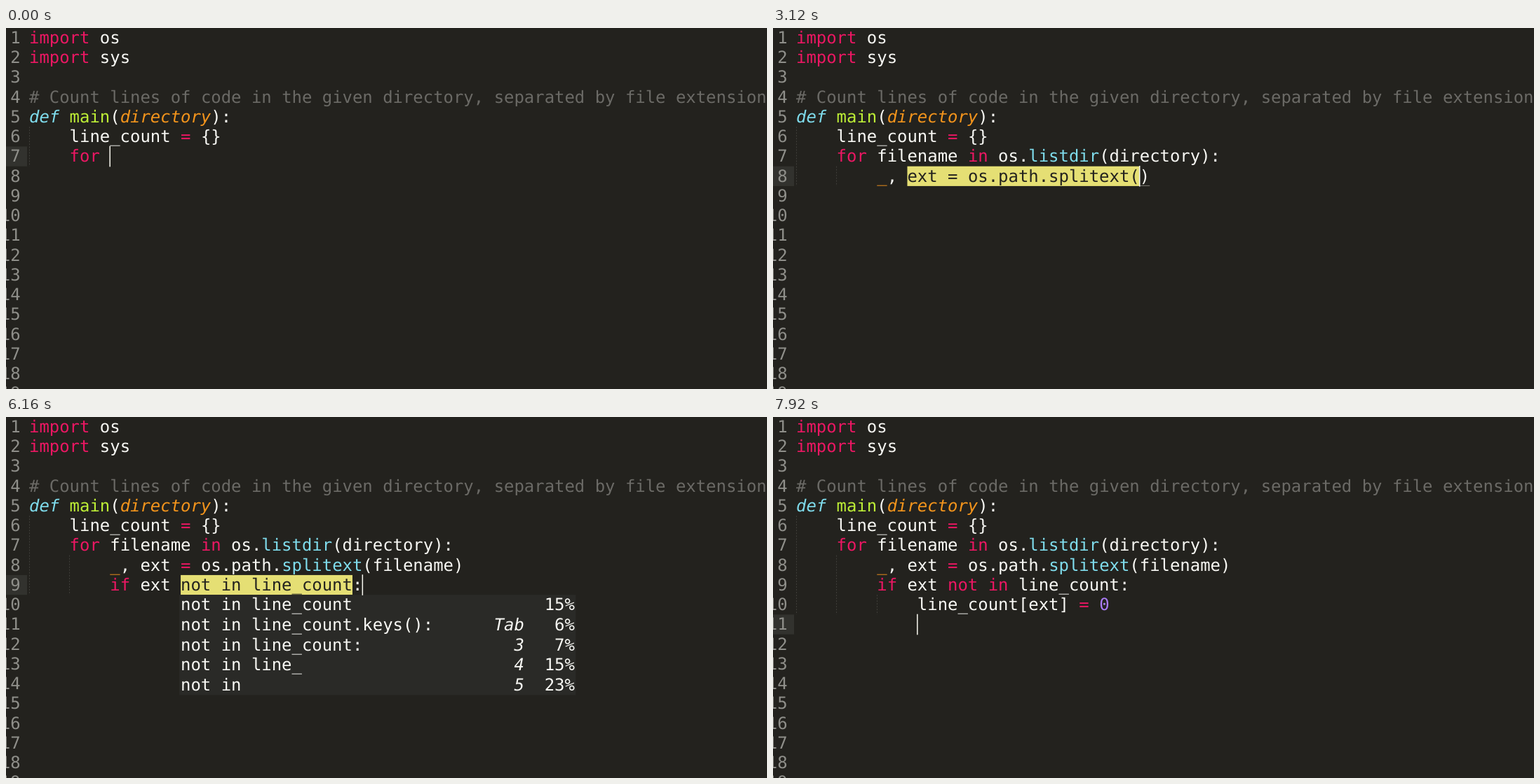
Recreate the animation shown at these times as an HTML page. Size 1085x516 px, loop 8 s.

```html
<!DOCTYPE html>
<html lang="en">
<head>
<meta charset="utf-8">
<title>Typing with completions</title>
<style>
  html, body { margin: 0; width: 100%; height: 100%; overflow: hidden; background: #23221e; }
  svg { display: block; width: 1085px; height: 516px; }
  text {
    font: 23.93px "DejaVu Sans Mono", "Liberation Mono", monospace;
    text-rendering: geometricPrecision;
    fill: #f8f8f4;
  }
  text.num { fill: #8f8f8a; }
  text.comment { fill: #6b6a66; }
  text.key { fill: #ec1763; }
  text.def { fill: #7fdcec; font-style: italic; }
  text.call { fill: #7fdcec; }
  text.name { fill: #bdee36; }
  text.arg { fill: #f3941c; font-style: italic; }
  text.skip { fill: #f3941c; }
  text.lit { fill: #aa7cf6; }
  text.dark { fill: #23221e; }
  text.it { font-style: italic; }
</style>
</head>
<body>
<svg id="stage" viewBox="0 0 1085 516"></svg>
<script>
(() => {
const LOOP = 8000, X0 = 33, CW = 14.405, LH = 28.24, ROW = 28.75, BASE = 22;
const colX = c => X0 + c * CW;
const lineY = n => (n - 1) * LH;
const pad = n => ' '.repeat(n);

const code = [
  'import os',
  'import sys',
  '',
  '# Count lines of code in the given directory, separated by file extension',
  'def main(directory):',
  '    line_count = {}',
  '    for filename in os.listdir(directory):',
  '        _, ext = os.path.splitext(filename)',
  '        if ext not in line_count:',
  '            line_count[ext] = 0'
];

// Completion lists: start column, then "text|percent" rows
const menus = {
  loop: [8, 'filename in os.listdir(directory):|24%', 'filename in os.listdir(|18%',
    'file in os.listdir(directory):|9%', 'filename in|21%', 'filename|26%'],
  split: [11, 'ext = os.path.splitext(|31%', 'ext = os.path.splitext(filename)|14%',
    'ext = os.path.|17%', 'ext = os.|12%', 'ext =|22%'],
  file: [34, 'filename)|42%', 'filename|27%', 'file)|8%', 'file|6%', 'f)|3%'],
  cond: [8, 'if os.path.isdir(os.path.join(directory, ext))|5%', 'if os.path.isdir(|11%',
    'if ext not in|9%', 'if ext ==|13%', 'if ext|28%'],
  ext: [11, 'ext|38%', "ext not in ['.py', '.js']|4%", 'ext not in|12%', 'ext ==|15%', 'ext in|9%'],
  test: [15, 'not in line_count|15%', 'not in line_count.keys():|6%', 'not in line_count:|7%',
    'not in line_|15%', 'not in|23%'],
  first: [12, 'line_count[ext]|19%', 'line_count[ext] = len(filename|4%', 'line_count[ext] = 0|6%',
    'line_count|17%', 'line|8%'],
  set: [12, 'line_count[ext] =|16%', 'line_count[ext]|17%', 'line_count[ext] = 1|11%',
    'line_count[ext] = 0|4%', 'line_count|17%']
};

// [start ms, line, text, options]; mark = picked columns, menu = open list, caret = column
const steps = [
  [0, 7, '    for '],
  [320, 7, '    for f', { menu: 'loop' }],
  [800, 7, code[6], { menu: 'loop', mark: [8, 42] }],
  [1360, 8, pad(8)],
  [1600, 8, pad(8) + '_'],
  [1760, 8, pad(8) + '_,'],
  [1880, 8, pad(8) + '_, '],
  [2160, 8, pad(8) + '_, e', { menu: 'split' }],
  [2800, 8, pad(8) + '_, ext = os.path.splitext()', { mark: [11, 34], caret: 34, pair: 34 }],
  [3280, 8, pad(8) + '_, ext = os.path.splitext(f)', { menu: 'file', caret: 35, pair: 35 }],
  [3520, 8, code[7], { menu: 'file', mark: [34, 43] }],
  [3760, 9, pad(8)],
  [4000, 9, pad(8) + 'i', { menu: 'cond' }],
  [4160, 9, pad(8) + 'if', { menu: 'cond' }],
  [4320, 9, pad(8) + 'if '],
  [4440, 9, pad(8) + 'if e'],
  [4640, 9, pad(8) + 'if e', { menu: 'ext' }],
  [4800, 9, pad(8) + 'if ex', { menu: 'ext' }],
  [4960, 9, pad(8) + 'if ext', { menu: 'ext' }],
  [5200, 9, pad(8) + 'if ext '],
  [5440, 9, pad(8) + 'if ext n', { menu: 'test' }],
  [5840, 9, pad(8) + 'if ext not in line_count', { menu: 'test', mark: [15, 32] }],
  [6120, 9, code[8], { menu: 'test', mark: [15, 32] }],
  [6240, 9, code[8]],
  [6400, 10, pad(12)],
  [6640, 10, pad(12) + 'l', { menu: 'first' }],
  [6800, 10, pad(12) + 'li', { menu: 'set' }],
  [7040, 10, pad(12) + 'line_count[ext] =', { menu: 'set', mark: [12, 29] }],
  [7440, 10, code[9], { mark: [12, 31] }],
  [7760, 11, pad(12)]
];

const rect = (x, y, w, h, fill) =>
  `<rect x="${x}" y="${y}" width="${w}" height="${h}" fill="${fill}"/>`;
const label = (s, col, y, cls = '') =>
  `<text class="${cls}" x="${colX(col).toFixed(2)}" y="${y.toFixed(2)}">${s}</text>`;

// Places each word on the character grid
function words(s, col, y, cls) {
  return [...s.matchAll(/\S+/g)].map(m => label(m[0], col + m.index, y, cls)).join('');
}

const rules = [
  ['comment', '#.*'],
  ['key', '\\b(?:import|for|in|if|not)\\b|='],
  ['def', '\\bdef\\b'],
  ['name', '\\bmain\\b'],
  ['arg', '(?<=main\\()directory'],
  ['call', '(?:listdir|splitext)(?=\\()'],
  ['skip', '\\b_\\b'],
  ['lit', '\\b\\d+\\b']
];
const lexer = new RegExp(rules.map(([k, r]) => `(?<${k}>${r})`).join('|'), 'g');

function paint(s, y, mark) {
  let out = '', at = 0;
  const put = (end, cls) => { out += words(s.slice(at, end), at, y, cls); at = end; };
  for (const m of s.matchAll(lexer)) {
    if (mark && m.index >= mark[0]) break;
    put(m.index);
    put(m.index + m[0].length, Object.keys(m.groups).find(k => m.groups[k]));
  }
  if (mark) {
    put(mark[0]);
    put(mark[1], 'dark');
  }
  put(s.length);
  return out;
}

function guides(s, n) {
  if (!s.trim()) return '';
  let out = '';
  for (let c = 0; c < s.search(/\S/); c += 4) {
    const x = Math.floor(colX(c)) + .5;
    out += `<path d="M${x} ${lineY(n)}v${LH}" stroke="#403f3a" stroke-dasharray="2 2"/>`;
  }
  return out;
}

function menuBox([col, ...rows], n, picked) {
  const items = rows.map(r => r.split('|'));
  const end = col + Math.max(...items.map(i => i[0].length)) + 14;
  const keys = [picked ? '' : 'Tab', picked ? 'Tab' : '2', '3', '4', '5'];
  const y0 = lineY(n + 1);
  let out = rect(colX(col) - 2, y0, (end - col) * CW + 3.5, ROW * 5 - .5, '#2a2a27');
  items.forEach(([s, pct], i) => {
    const y = y0 + BASE + i * ROW;
    out += words(s, col, y) + label(keys[i], end - 5 - keys[i].length, y, 'it')
      + label(pct, end - pct.length, y);
  });
  return out;
}

function scene([, n, text, { menu, mark, caret = text.length, pair } = {}]) {
  let out = rect(0, lineY(n), 30, LH, '#32322e');
  for (let i = 1; i <= 19; i++) {
    const s = String(i);
    out += `<text class="num" x="${20.6 - s.length * CW}" y="${lineY(i) + BASE}">${s}</text>`;
  }
  [...code.slice(0, n - 1), text].forEach((s, i) => {
    const line = i + 1, m = line === n ? mark : null;
    out += guides(s, line);
    if (m) out += rect(colX(m[0]), lineY(n), (m[1] - m[0]) * CW, LH, '#e5df74');
    out += paint(s, lineY(line) + BASE, m);
  });
  if (pair) out += rect(colX(pair), lineY(n) + LH - 1, CW, 1, '#77766f');
  if (menu) out += menuBox(menus[menu], n, !!mark);
  return out + rect(colX(caret) - .8, lineY(n) - .7, 1.5, LH + 1.4, '#f8f8f0');
}

const stage = document.getElementById('stage');
const start = performance.now();
let shown;

function tick(now) {
  const t = Math.max(0, now - start) % LOOP;
  const step = steps.filter(s => s[0] <= t).pop();
  if (step !== shown) {
    stage.innerHTML = scene(step);
    shown = step;
  }
  requestAnimationFrame(tick);
}
tick(start);
})();
</script>
</body>
</html>
```
